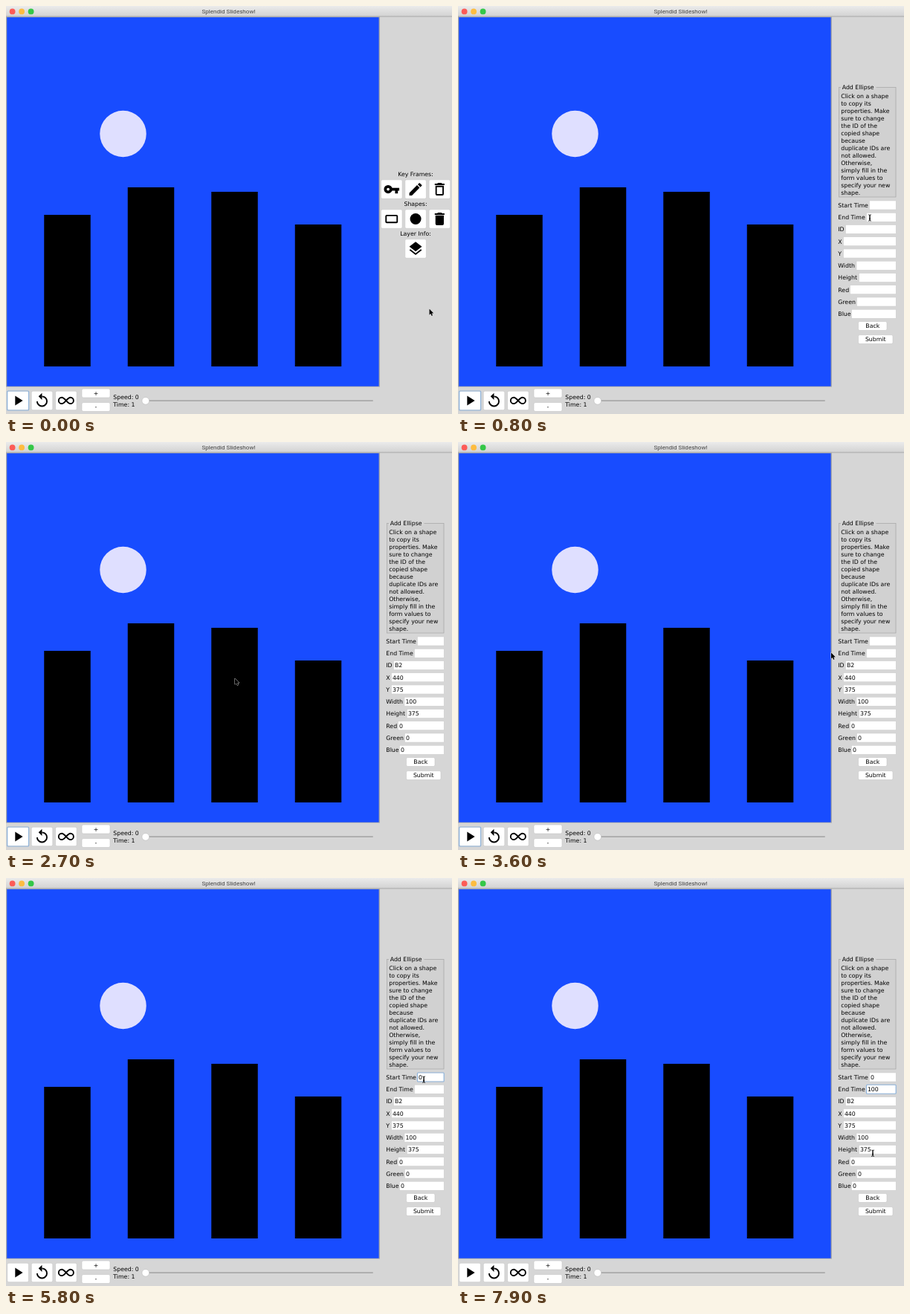
Write an HTML page that moves like this. It is 600 px wide and 549 px high and loops after 8000 ms.

```html
<!DOCTYPE html>
<html lang="en">
<head>
<meta charset="utf-8">
<title>Shape editor</title>
<style>
  html, body { margin: 0; width: 100%; height: 100%; overflow: hidden; background: #d6d6d6; }
  svg { display: block; width: 600px; height: 549px; }
  text { font: 7.8px "DejaVu Sans", sans-serif; white-space: pre; }
  .title { font: 8.1px Roboto, sans-serif; fill: #444; }
  .mid { text-anchor: middle; }
  .button { fill: #fff; stroke: #c6c6c6; stroke-width: .6; }
  .field { fill: #fff; stroke: #cbcbcb; stroke-width: .5; }
  .focus { fill: none; stroke: #8fb4dc; stroke-width: 1.2; }
  .line { fill: none; stroke: #000; stroke-width: 2; }
</style>
</head>
<body>
<svg id="stage" viewBox="0 0 600 549"></svg>
<script>
const LOOP = 8000, STEP = 100;
const stage = document.getElementById('stage');

const text = (x, y, s, cls = '') => `<text x="${x}" y="${y}" class="${cls}">${s}</text>`;
const box = (x, y, w, h, attrs) => `<rect x="${x}" y="${y}" width="${w}" height="${h}" ${attrs}/>`;
const dot = (x, y, r, attrs) => `<circle cx="${x}" cy="${y}" r="${r}" ${attrs}/>`;
const button = (x, y, w, h) => box(x, y, w, h, 'rx="2" class="button"');
const textButton = (x, y, w, s) => button(x, y, w, 12) + text(x + w / 2, y + 8.7, s, 'mid');

// Icons live on a 24-unit grid.
const line = d => `<path d="${d}" class="line"/>`;
const fill = d => `<path d="${d}" fill-rule="evenodd"/>`;
const lid = 'M5 4h3.5l1-1h5l1 1H19v2H5z';
const icons = {
  play: fill('M8 5v14l11-7z'),
  replay: line('M12 6a7 7 0 1 1-7 7') + fill('M12 1L7 6l5 5z'),
  loop: line('M12 12c3-3.5 4.3-4.5 6.2-4.5a4.5 4.5 0 0 1 0 9c-2 0-3.2-1-6.2-4.5s-4.3-4.5-6.2-4.5a4.5 4.5 0 0 0 0 9c2 0 3.2-1 6.2-4.5z'),
  key: dot(7, 12, 4, 'fill="none" stroke="#000" stroke-width="4"') + fill('M12 10h11v4h-2v4h-4v-4h-5z'),
  edit: fill('M3 17.3V21h3.7L17.8 9.9l-3.7-3.7zM15.1 5.1l2.5-2.3 3.6 3.6-2.3 2.5z'),
  clear: fill(lid + 'M6 7h12v12q0 2-2 2H8q-2 0-2-2zM8 9v10h8V9z'),
  rect: box(4, 7, 16, 10, 'rx="1" class="line"'),
  ellipse: dot(12, 12, 8, ''),
  trash: fill(lid + 'M6 7h12v12q0 2-2 2H8q-2 0-2-2z'),
  layers: fill('M12 2l9 7-9 7-9-7zM3 14.1l1.6-1.3 7.4 5.7 7.4-5.7 1.6 1.3-9 7z')
};
const iconButton = (x, y, name) => button(x, y, 28.6, 25.5) +
  `<g transform="translate(${x + 3} ${y + 1.5}) scale(.9375)">${icons[name]}</g>`;

const rows = [
  ['Start Time', 553.5], ['End Time', 549.5], ['ID', 521.5, 'B2'], ['X', 518.5, '440'], ['Y', 518.5, '375'],
  ['Width', 536, '100'], ['Height', 539.5, '375'], ['Red', 527.5, '0'], ['Green', 536.5, '0'], ['Blue', 529.5, '0']
].map(([label, x, value = ''], i) => ({ label, x, value, y: 268 + 16.25 * i }));

const help = `Click on a shape|to copy its|properties. Make|sure to change|the ID of the|copied shape|because|duplicate IDs are|not allowed.|Otherwise,|simply fill in the|form values to|specify your new|shape.`.split('|');

const titleBar = `<linearGradient id="bar" x2="0" y2="1"><stop stop-color="#ebebeb"/><stop offset="1" stop-color="#d2d2d2"/></linearGradient>` +
  box(0, 0, 600, 14, 'fill="url(#bar)"') + box(0, 13.6, 600, .9, 'fill="#a3a3a3"') +
  ['#fc5b57', '#fdbc40', '#34c748'].map((c, i) => dot(8.6 + 12.5 * i, 7.4, 3.9, `fill="${c}"`)).join('') +
  text(299.5, 10.4, 'Splendid Slideshow!', 'title mid');

const scene = box(0, 14.3, 503, 498.2, 'fill="#aaa"') + box(1.2, 15.2, 500.4, 496.5, 'fill="#184cff"') +
  dot(157.5, 172, 31.25, 'fill="#dfdfff"') +
  [281, 244, 250, 294].map((y, i) => box(51.25 + 112.5 * i, y, 62.5, 485 - y, '')).join('');

const controls = ['play', 'replay', 'loop'].map((n, i) => iconButton(1.8 + 32.4 * i, 518.2, n)).join('') +
  textButton(102, 515, 38, '+') + textButton(102, 533.5, 38, '-') +
  text(144.3, 529, 'Speed: 0') + text(144.3, 539, 'Time: 1') +
  box(188, 530.2, 306, 1.8, 'rx=".9" fill="#a9a9a9"') +
  dot(187.8, 531.3, 4.9, 'fill="#fff" stroke="#bbb" stroke-width=".6"');

const tools = [['Key Frames:', 'key', 'edit', 'clear'], ['Shapes:', 'rect', 'ellipse', 'trash']]
  .map(([label, ...names], r) => text(551, 229.3 + 40 * r, label, 'mid') +
    names.map((n, i) => iconButton(504.5 + 32.3 * i, 233.8 + 40 * r, n)).join('')).join('') +
  text(551, 309.3, 'Layer Info:', 'mid') + iconButton(536.8, 313.8, 'layers');

const form = box(512.4, 109.4, 76.6, 147.6, 'fill="#d1d1d1" stroke="#aaa" stroke-width=".8"') +
  box(515, 107, 47.5, 5, 'fill="#d5d5d5"') + text(516.7, 112.4, 'Add Ellipse') +
  help.map((s, i) => text(515.2, 124 + 10 * i, s)).join('') +
  rows.map(r => text(511.3, r.y + 2.8, r.label) +
    box(r.x, r.y - 6, 589.2 - r.x, 12, 'class="field"') +
    `<text class="value" x="${r.x + 1.4}" y="${r.y + 2.8}"></text>`).join('') +
  textButton(538.5, 424.5, 38.5, 'Back') + textButton(538.5, 442.6, 46.5, 'Submit');

stage.innerHTML = box(0, 0, 600, 549, 'fill="#d6d6d6"') + titleBar + scene + controls +
  `<g id="tools">${tools}</g><g id="form">${form}</g>` +
  box(0, 0, 0, 0, 'id="focus" rx="1" class="focus"') + box(0, 0, .7, 9, 'id="caret"') +
  `<g id="pointer">
    <g id="ring" fill="none">${dot(0, 0, 10, 'stroke="#fff" stroke-width="2.4" opacity=".6"') + dot(0, 0, 10, 'stroke="#000" stroke-width="1.2"')}</g>
    <path id="arrow" d="M0 0V8.2L1.9 6.5 3.1 9.4 4.5 8.8 3.3 6H5.9z" stroke="#fff" stroke-width=".8" paint-order="stroke"/>
    <path id="beam" d="M-1.8-4.2Q0-4.2 0-3V3Q0 4.2-1.8 4.2M1.8-4.2Q0-4.2 0-3V3Q0 4.2 1.8 4.2M-1 1.2H1" fill="none" stroke="#000" stroke-width=".9"/>
  </g>`;

const $ = id => document.getElementById(id);
const show = (id, on) => $(id).setAttribute('display', on ? 'inline' : 'none');
const place = (id, attrs) => { for (const k in attrs) $(id).setAttribute(k, attrs[k]); };
const values = document.querySelectorAll('.value');

// Pointer stops: time, x, y
const path = [[0, 569.5, 407.5], [100, 569, 406], [400, 551, 288], [600, 551, 287], [800, 554, 285], [1400, 554, 285],
  [1900, 456, 298.5], [2400, 308, 318], [2900, 308, 318], [3600, 502, 283.5], [4200, 562, 269.5],
  [5700, 562, 269.5], [6200, 563, 285.2], [7300, 563, 285.2], [7900, 558, 370.3]];
const clicks = [[400, 600], [2400, 2600], [4600, 4700], [6400, 6600]];
const typing = [[5300, 0, '0'], [6900, 1, '1'], [7100, 1, '10'], [7300, 1, '100']];

function pointerAt(t) {
  const i = path.findIndex(p => p[0] > t);
  if (i < 0) return path.at(-1).slice(1);
  const [a, b] = [path[i - 1], path[i]];
  const u = (t - a[0]) / (b[0] - a[0]), k = u * u * (3 - 2 * u);
  // The long sweep is mid-motion at its inner stop, so it stays linear.
  const e = a[0] === 1400 || a[0] === 1900 ? u : k;
  return [a[1] + (b[1] - a[1]) * e, a[2] + (b[2] - a[2]) * e];
}

function draw(t) {
  const inForm = t >= 600;
  show('tools', !inForm);
  show('form', inForm);

  const typed = ['', ''];
  let lastInput = t < 6400 ? 4600 : 6400;
  for (const [at, row, s] of typing) if (t >= at) {
    typed[row] = s;
    lastInput = Math.max(lastInput, at);
  }
  rows.forEach((r, i) => values[i].textContent = i < 2 ? typed[i] : t >= 2500 ? r.value : '');

  const active = t < 4600 ? -1 : t < 6400 ? 0 : 1;
  if (active < 0) {
    place('focus', { x: 1.6, y: 518, width: 29, height: 26 });
    show('caret', false);
  } else {
    const r = rows[active];
    place('focus', { x: r.x, y: r.y - 6, width: 589.2 - r.x, height: 12 });
    place('caret', { x: r.x + 1.3 + values[active].getComputedTextLength(), y: r.y - 4.5 });
    show('caret', (t - lastInput) % 1000 < 500);
  }

  const [x, y] = pointerAt(t);
  const overField = inForm && rows.some(r => x > r.x && Math.abs(y - r.y) < 7);
  place('pointer', { transform: `translate(${x} ${y})` });
  show('arrow', !overField);
  show('beam', overField);
  show('ring', clicks.some(([from, to]) => t >= from && t < to));
}

const start = performance.now();
function tick() {
  draw(Math.floor((performance.now() - start) % LOOP / STEP) * STEP);
  requestAnimationFrame(tick);
}
tick();
</script>
</body>
</html>
```
